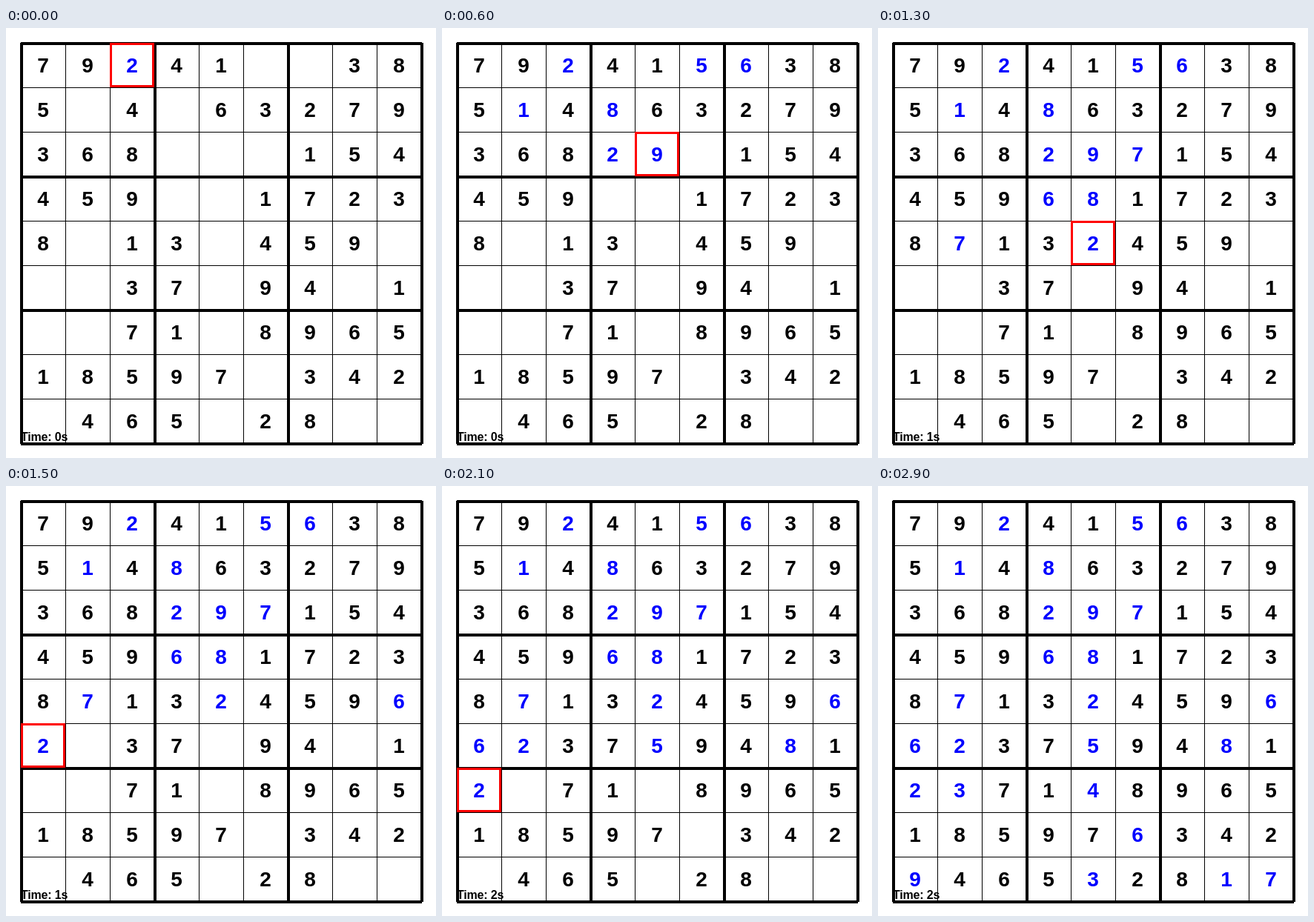
An HTML page with a canvas for the animation above (3 s loop, 580 px wide and 580 px high).

```html
<!DOCTYPE html>
<html lang="en">
<head>
<meta charset="utf-8">
<title>Sudoku solver</title>
<style>
  html, body { margin: 0; width: 100%; height: 100%; overflow: hidden; background: #fff; }
  canvas { display: block; }
</style>
</head>
<body>
<canvas id="stage" width="580" height="580"></canvas>
<script>
const ctx = document.getElementById('stage').getContext('2d');
const FONT = '"Liberation Sans", Arial, sans-serif';
const ORIGIN = 20, CELL = 60, SIZE = 9 * CELL;
const STEP_MS = 100, STEPS = 30;

const givens = [
  '79.41..38', '5.4.63279', '368...154',
  '459..1723', '8.13.459.', '..37.94.1',
  '..71.8965', '18597.342', '.465.28..'
].map(row => [...row].map(ch => Number(ch) || 0));

function fits(board, r, c, n) {
  for (let i = 0; i < 9; i++) {
    const br = r - r % 3 + Math.floor(i / 3), bc = c - c % 3 + i % 3;
    if (board[r][i] === n || board[i][c] === n || board[br][bc] === n) return false;
  }
  return true;
}

// Backtracking solver; every placement or removal is one step.
function record() {
  const board = givens.map(row => [...row]);
  const steps = [];
  const put = (r, c, n) => {
    board[r][c] = n;
    steps.push({ board: board.map(row => [...row]), active: [r, c] });
  };
  const solve = pos => {
    if (pos === 81) return true;
    const r = Math.floor(pos / 9), c = pos % 9;
    if (board[r][c]) return solve(pos + 1);
    for (let n = 1; n <= 9; n++) {
      if (!fits(board, r, c, n)) continue;
      put(r, c, n);
      if (solve(pos + 1)) return true;
      put(r, c, 0);
    }
    return false;
  };
  solve(0);
  steps.push({ board, active: null });
  return steps;
}

function drawGrid() {
  ctx.fillStyle = '#000';
  for (let i = 0; i <= 9; i++) {
    const p = ORIGIN + i * CELL;
    const w = i % 3 ? 1 : 4;
    const a = i % 3 ? p : p - 1;
    ctx.fillRect(a, ORIGIN, w, SIZE + 1);
    ctx.fillRect(ORIGIN, a, SIZE + 1, w);
  }
}

function drawDigits(board) {
  ctx.font = `bold 28px ${FONT}`;
  ctx.textAlign = 'center';
  board.forEach((row, r) => row.forEach((n, c) => {
    if (!n) return;
    ctx.fillStyle = givens[r][c] ? '#000' : '#00f';
    ctx.fillText(n, ORIGIN + (c + 0.5) * CELL, ORIGIN + r * CELL + 40);
  }));
}

function drawActive([r, c]) {
  ctx.strokeStyle = '#f00';
  ctx.lineWidth = 3;
  ctx.strokeRect(ORIGIN + c * CELL + 1.5, ORIGIN + r * CELL + 1.5, CELL - 3, CELL - 3);
}

function drawTime(step) {
  ctx.font = `bold 16px ${FONT}`;
  ctx.textAlign = 'left';
  ctx.fillStyle = '#000';
  ctx.letterSpacing = '-0.18px';
  ctx.fillText(`Time: ${Math.floor(Math.max(0, step - 1) / 10)}s`, ORIGIN, 557);
  ctx.letterSpacing = '0px';
}

const steps = record();
let shown = -1;

function draw(step) {
  const { board, active } = steps[step];
  ctx.fillStyle = '#fff';
  ctx.fillRect(0, 0, 580, 580);
  drawGrid();
  drawDigits(board);
  if (active) drawActive(active);
  drawTime(step);
}

const start = performance.now();
function tick() {
  const step = Math.floor((performance.now() - start) / STEP_MS) % STEPS;
  if (step !== shown) draw(shown = step);
  requestAnimationFrame(tick);
}
tick();
</script>
</body>
</html>
```
